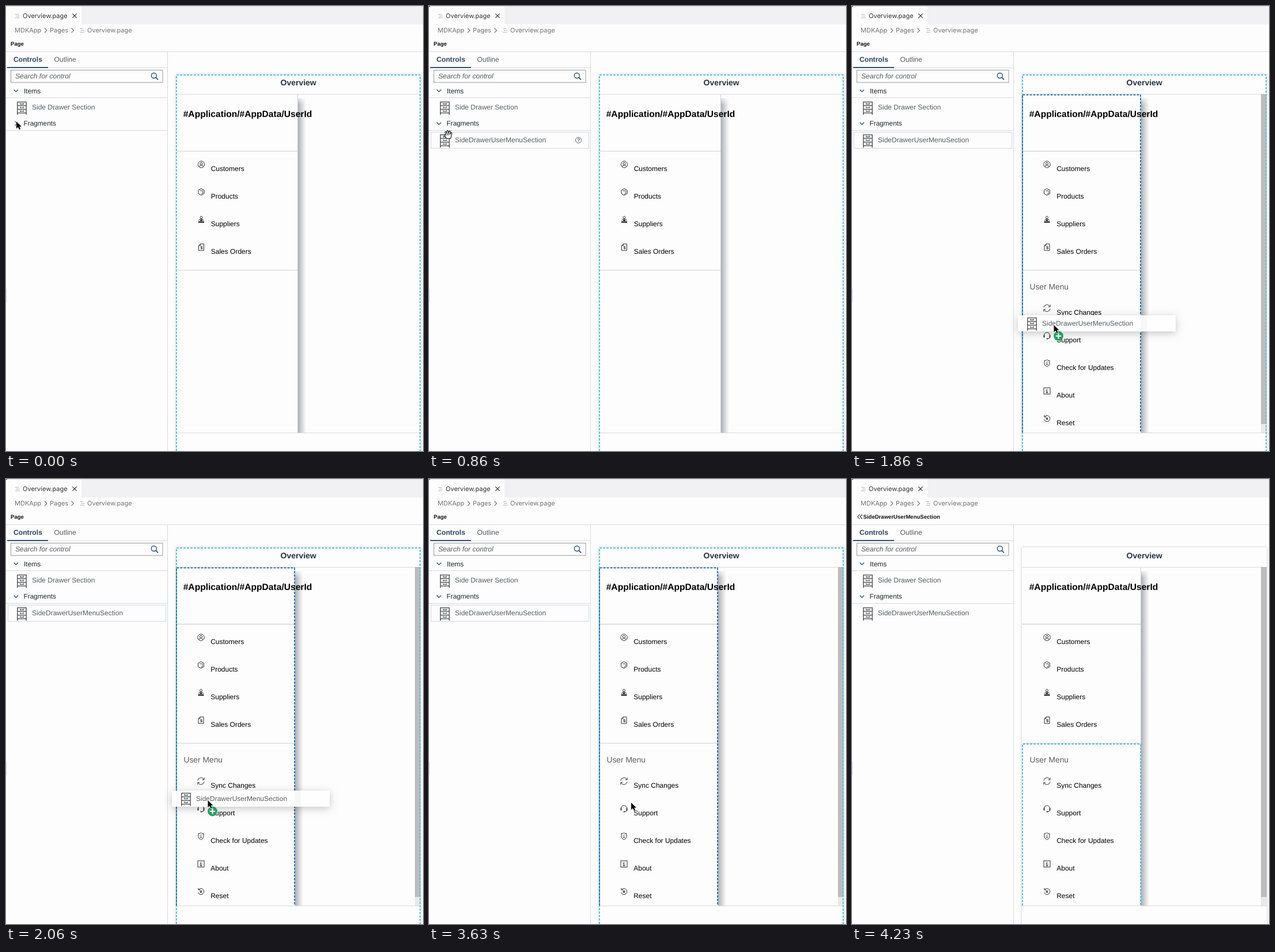
Recreate the animation shown at these times as an HTML page with a canvas. Size 724 px wide and 774 px high, loop 4500 ms.

```html
<!DOCTYPE html>
<html lang="en">
<head>
<meta charset="utf-8">
<title>Page editor</title>
<style>
html, body { margin: 0; width: 100%; height: 100%; overflow: hidden; background: #fdfdfd; }
canvas { display: block; width: 724px; height: 774px; }
</style>
</head>
<body>
<canvas id="stage" width="724" height="774"></canvas>
<script>
const ctx = document.getElementById('stage').getContext('2d');
ctx.textRendering = 'geometricPrecision';
const LOOP = 4500;
const SANS = '"Liberation Sans", Arial, sans-serif';
const UI = 'Inter, sans-serif';
const PAPER = '#fdfdfd', RULE = '#d9dadc', INK = '#222529', GREY = '#595c5f';
const CYAN = '#62c2df', BLUE = '#2f78a8';

// Basic drawing helpers
function text(str, x, y, size, color, style = '', family = SANS) {
  ctx.font = `${style} ${size}px ${family}`;
  ctx.fillStyle = color;
  ctx.fillText(str, x, y);
}
function box(x, y, w, h, color) {
  ctx.fillStyle = color;
  ctx.fillRect(x, y, w, h);
}
function frame(x, y, w, h, color, width = 1) {
  ctx.strokeStyle = color;
  ctx.lineWidth = width;
  ctx.strokeRect(x, y, w, h);
}
function path(d, color, width = 1, fill = null) {
  const shape = new Path2D(d);
  if (fill) { ctx.fillStyle = fill; ctx.fill(shape); }
  if (color) { ctx.strokeStyle = color; ctx.lineWidth = width; ctx.stroke(shape); }
}
function ring(x, y, r, color, width = 1) {
  ctx.beginPath();
  ctx.arc(x, y, r, 0, Math.PI * 2);
  ctx.strokeStyle = color;
  ctx.lineWidth = width;
  ctx.stroke();
}
function dot(x, y, r, color) {
  ctx.beginPath();
  ctx.arc(x, y, r, 0, Math.PI * 2);
  ctx.fillStyle = color;
  ctx.fill();
}
function at(x, y, draw) {
  ctx.save();
  ctx.translate(x, y);
  draw();
  ctx.restore();
}
function dashes(points, color) {
  ctx.save();
  ctx.setLineDash([4, 2]);
  path(points, color, 2);
  ctx.restore();
}

// Icons, each centred on its own origin
const DARK = '#2b2d30';
const icons = {
  person() {
    ring(0, 0, 5.7, DARK);
    ring(0, -1.2, 2.1, DARK);
    path('M-3.6 4.2 Q-3 1.2 0 1.2 Q3 1.2 3.6 4.2', DARK);
  },
  product() {
    path('M0 -5.8 L5 -3.2 V2.8 L0 5.8 L-5 2.8 V-3.2 Z', DARK);
    path('M-2.5 -2.8 L0 -1.8 L2.5 -3 M2.6 -2 V2.5 L0 4', DARK, .9);
  },
  supplier() {
    ring(0, -3.7, 2, DARK);
    path('M-4 2 V.8 Q-3.5 -.8 0 -.8 Q3.5 -.8 4 .8 V2', DARK);
    path('M-2 0 H2 V2.4 H-2 Z M-5 3 H5 V5.4 H-5 Z', null, 0, DARK);
  },
  order() {
    path('M-1.5 -5.7 H4.5 V5.7 H-4.5 V-2.6 Z M-1.5 -5.7 V-2.6 H-4.5', DARK);
    text('$', -1.5, 3.6, 7.5, DARK, 'bold');
  },
  sync() {
    path('M-5.7 -1 A5.7 5.7 0 0 1 5 -2.8 M5.6 -6 V-2.4 H2.2', DARK);
    path('M5.7 1 A5.7 5.7 0 0 1 -5 2.8 M-5.6 6 V2.4 H-2.2', DARK);
  },
  headset() {
    path('M-5 1 V-.6 A5 5 0 0 1 5 -.6 V2 Q5 5.3 1 5.3', DARK);
    path('M-6 -1 H-4 V3 H-6 Z M4 -1 H6 V3 H4 Z M-1 4.4 H2 V6 H-1 Z', null, 0, DARK);
  },
  shield() {
    path('M0 -6 Q2 -4.8 4.5 -4.8 V1 Q4 4 0 6 Q-4 4 -4.5 1 V-4.8 Q-2 -4.8 0 -6 Z', DARK);
    path('M-1.8 -2.5 L-.5 -1.2 L2 -3.3 M-1.6 .4 L1.6 3 M1.6 .4 L-1.6 3', DARK, .9);
  },
  info() {
    frame(-5.5, -5.5, 11, 11, DARK);
    path('M0 -3.5 V-2 M-1.5 -.6 H0 V3.2 M-1.6 3.2 H1.8', DARK, 1.2);
  },
  reset() {
    path('M-4.2 -3 A5.2 5.2 0 1 1 -5 1.5 M-4.6 -6 V-2.8 H-1.3', DARK);
    path('M-1.8 -1.6 L1.8 2 M1.8 -1.6 L-1.8 2', DARK, 1.2);
  },
  drawer() {
    frame(-7.7, -10.5, 15.4, 19, GREY, 1.5);
    path('M-7.7 -4.2 H7.7 M-7.7 2.2 H7.7', GREY, 1.4);
    for (const y of [-8, -1.6, 4.8]) path(`M-2.8 ${y - .8} V${y + 1} H2.8 V${y - .8}`, GREY, 1.3);
    path('M-7.7 8 V11.7 M7.7 8 V11.7', GREY, 1.6);
  },
  file() {
    path('M-3.5 -3 H2.5 M-2 0 H4 M-3.5 3 H4', '#b3b5b7');
  }
};
function chevron(x, y, open) {
  at(x, y, () => path(open ? 'M-3.7 -1.8 L0 1.8 L3.7 -1.8' : 'M-1.8 -3.7 L1.8 0 L-1.8 3.7', '#1d4a78', 1.3));
}

// Mouse pointers, with the hot spot or centre at the origin
const cursors = {
  arrow() {
    path('M0 0 V12.2 L2.9 9.5 L5 14 L7.2 13 L5.2 8.7 H9 Z', '#fff', 1.4, '#000');
    path('M0 0 V12.2 L2.9 9.5 L5 14 L7.2 13 L5.2 8.7 H9 Z', null, 0, '#000');
  },
  point() {
    path('M-1 1 Q.5 -1 2 1 V6 L7 7 Q9 8 8.5 11 L7 16 H0 L-4 10 Q-4 8 -1 10 Z', '#111', 1.1, '#fff');
  },
  open() {
    path('M-2.5 7 L-6.5 1.5 Q-6.5 -.8 -4 1 L-5.2 -4 Q-4.4 -6 -2.8 -4 L-1.8 -1 L-2 -6 Q-.8 -7.8 .6 -6 L.9 -1 L2 -5.6 Q3.4 -7 4.2 -5 L3.5 -.5 L5.2 -3 Q7 -3.6 6.6 -1.4 L4.6 7 Z', '#111', 1.1, '#fff');
  },
  grab() {
    path('M-2.5 7.5 L-5.8 2.5 Q-5.6 .2 -3.6 1.6 L-4.4 -5 Q-3.4 -7.2 -2 -5.2 L-1.4 -2 Q0 -3.6 1.4 -2 Q3 -3.2 4.2 -1.4 Q6.3 -1.4 6 1.2 L4.6 7.5 Z', '#111', 1.1, '#fff');
    path('M-1.4 -2 V1.6 M1.4 -2 V1.6 M4 -1.4 V1.6', '#111');
  }
};
const pointerSteps = [
  [0, 'arrow', 18, 201], [30, 'arrow', 17, 196], [460, 'point', 18, 203],
  [860, 'open', 33, 223.5], [1060, 'open', 43.5, 226.5], [1260, 'open', 63.5, 238],
  [1460, 'open', 66.5, 239], [1660, 'grab', 69, 238], [1860, 'arrow', 350.5, 555],
  [2060, 'arrow', 350.5, 559], [2230, 'arrow', 350.5, 563], [3630, 'arrow', 351, 563],
  [4230, null, 0, 0]
];

function drawHeader(t, renamed) {
  box(0, 0, 724, 32, '#f1f1f4');
  box(0, 0, 724, 1, '#dedee1');
  box(0, 1, 131, 31, PAPER);
  if (t >= 30) box(0, 0, 2, 1, '#222');
  at(19.5, 17.5, icons.file);
  text('Overview.page', 29, 21, 11, '#333', '', UI);
  at(119, 17, () => path('M-3.7 -3.7 L3.7 3.7 M3.7 -3.7 L-3.7 3.7', '#333', 1.2));
  text('MDKApp', 15, 46, 11, '#737373', '', UI);
  text('Pages', 76, 46, 11, '#737373', '', UI);
  text('Overview.page', 141, 46, 11, '#737373', '', UI);
  for (const x of [69, 115.5]) at(x, 42.5, () => path('M-2 -4 L2 0 L-2 4', '#777', 1.1));
  at(132, 42.5, icons.file);
  if (renamed) {
    path('M13.3 61.7 L9.8 65.5 L13.3 69.3 M17.8 61.7 L14.3 65.5 L17.8 69.3', INK, 1.1);
    text('SideDrawerUserMenuSection', 19.5, 68.5, 9.57, '#111', 'bold');
  } else {
    text('Page', 8, 68.5, 9.57, '#111', 'bold');
  }
  box(0, 79, 724, 1, RULE);
}

function drawPanel(t) {
  const open = t >= 860;
  box(280, 80, 1, 694, RULE);
  box(0, 492, 1, 23, '#d7d9f3');
  text('Controls', 13, 97, 12.15, '#2c435a', 'bold');
  text('Outline', 83.5, 97, 12.1, GREY);
  box(0, 107, 280, 1, RULE);
  box(2, 106, 71, 2, '#35516e');
  frame(8.5, 111.5, 263.5, 21.5, '#97999c');
  text('Search for control', 16, 126, 12.15, GREY, 'italic');
  ring(256.8, 121, 4.5, '#2d5279', 1.4);
  path('M260 124.2 L264 128.3', '#2d5279', 1.8);
  chevron(17.3, 147.3, true);
  text('Items', 31, 151.5, 12, INK);
  box(0, 159, 280, 1, RULE);
  at(27.5, 177.5, icons.drawer);
  text('Side Drawer Section', 45, 180, 12, GREY);
  chevron(17.3, 204.3, open);
  text('Fragments', 30.5, 208, 11.8, INK);
  box(0, 216, 280, 1, RULE);
  if (!open) return;
  if (t < 4230) frame(3.5, 219.5, 274, 28, '#d5d8e0');
  at(27.5, 234.5, icons.drawer);
  text('SideDrawerUserMenuSection', 45, 237, 12, GREY);
  if (t < 1860) {
    ring(259.5, 233.3, 5, GREY);
    text('?', 257.2, 236.4, 8.4, GREY, 'bold');
  }
}

const mainMenu = [['person', 'Customers'], ['product', 'Products'], ['supplier', 'Suppliers'], ['order', 'Sales Orders']];
const userMenu = [['sync', 'Sync Changes'], ['headset', 'Support'], ['shield', 'Check for Updates'], ['info', 'About'], ['reset', 'Reset']];
function drawMenu(items, x, y) {
  items.forEach(([icon, label], i) => {
    at(x, y + i * 48, icons[icon]);
    text(label, x + 16.7, y + 11.5 + i * 48, 12, '#000');
  });
}

function drawPreview(t) {
  const added = t >= 1860, chosen = t >= 3830;
  const edge = added ? 502 : 507;

  ctx.save();
  ctx.shadowColor = 'rgba(0,0,0,.2)';
  ctx.shadowBlur = 4;
  box(295, 119, 425, 670, PAPER);
  ctx.restore();
  box(295, 153, 425, 1, RULE);
  box(295, 742, 425, 1, RULE);

  const shade = ctx.createLinearGradient(edge, 0, edge + 14, 0);
  shade.addColorStop(0, 'rgba(100,110,125,.54)');
  shade.addColorStop(.4, 'rgba(110,116,126,.33)');
  shade.addColorStop(1, 'rgba(120,124,128,0)');
  box(edge, 160, 14, 582, shade);
  const cap = ctx.createLinearGradient(0, 156, 0, 172);
  cap.addColorStop(0, PAPER);
  cap.addColorStop(1, 'rgba(253,253,253,0)');
  box(edge, 156, 14, 16, cap);
  box(edge - 1, 154, 1, 588, '#ccd0d5');

  box(296, 252, edge - 296, 1, added ? '#c4c6c8' : '#cdd1d5');
  box(296, 459, edge - 296, 1, '#cdd1d5');
  if (added) {
    box(710, 153, 10, 574, '#bdbdbf');
    box(710, 727, 10, 15, '#e9e9ea');
  }

  if (!chosen) dashes('M296 774 V120 H719 V774', CYAN);
  if (added && !chosen) dashes('M296 742 V154.5 H501 V742', BLUE);
  if (chosen) dashes('M296 742 V461 H501 V742', CYAN);

  text('Overview', 476.5, 137.5, 14, '#26323e', 'bold');
  text('#Application/#AppData/UserId', 307.7, 193, 15.6, '#000', 'bold');
  const x = added ? 338.5 : 339;
  drawMenu(mainMenu, x, 275.5);
  if (added) {
    text('User Menu', 308.5, 493, 13.8, GREY);
    drawMenu(userMenu, x, 525.5);
  }
}

function drawGhost(t) {
  if (t < 1860 || t >= 3630) return;
  const y = t < 2060 ? 538 : t < 2230 ? 542 : 546;
  const x = t < 2230 ? 288 : 287.5;
  ctx.save();
  ctx.shadowColor = 'rgba(0,0,0,.22)';
  ctx.shadowBlur = 14;
  ctx.shadowOffsetY = 3;
  box(x, y, 274, 28, '#fefefe');
  ctx.restore();
  box(502, y, 10, 28, 'rgba(110,115,120,.05)');
  at(x + 24.5, y + 15, icons.drawer);
  text('SideDrawerUserMenuSection', x + 42, y + 18, 12, GREY);
  dot(358.5, y + 36, 8.4, '#279d61');
  path(`M353.8 ${y + 36} H363.2 M358.5 ${y + 31.3} V${y + 40.7}`, '#fff', 2.2);
}

function render(t) {
  box(0, 0, 724, 774, PAPER);
  drawPreview(t);
  drawHeader(t, t >= 3830);
  drawPanel(t);
  drawGhost(t);
  const [, kind, x, y] = pointerSteps.findLast(step => t >= step[0]);
  if (kind) at(x, y, cursors[kind]);
}

const start = performance.now();
function tick() {
  render((performance.now() - start) % LOOP);
  requestAnimationFrame(tick);
}
tick();
</script>
</body>
</html>
```
